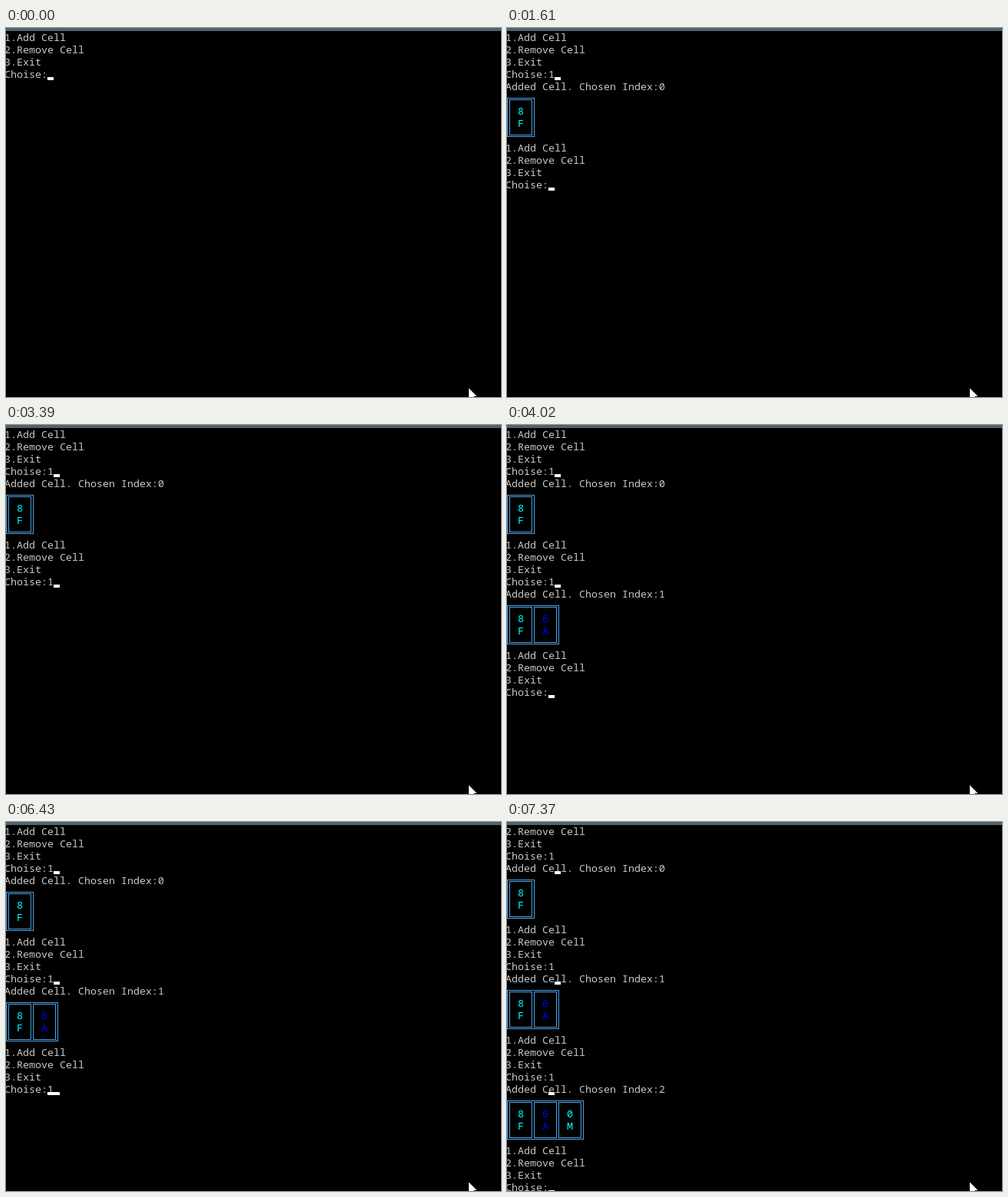
Recreate the animation shown at these times as an HTML page. Size 645x481 px, loop 8 s.

```html
<!DOCTYPE html>
<html lang="en">
<head>
<meta charset="utf-8">
<title>Console menu</title>
<style>
  html, body { margin: 0; width: 100%; height: 100%; overflow: hidden; background: #000; }
  svg { display: block; width: 645px; height: 481px; }
  text {
    font: 13.3333px "Noto Sans Mono", "DejaVu Sans Mono", monospace;
    fill: #c8c8c8;
    white-space: pre;
  }
  .frame { fill: none; stroke: #4ba3e8; shape-rendering: crispEdges; }
  .caret { fill: #fff; shape-rendering: crispEdges; }
  #log { animation: scroll 8s step-end infinite; }
  @keyframes scroll {
    0% { transform: translateY(0); }
    92.125%, 100% { transform: translateY(-16px); }
  }
</style>
</head>
<body>
<svg viewBox="0 0 645 481">
  <g id="log"></g>
  <g id="carets"></g>
  <rect width="645" height="4" fill="#4f626e"/>
  <path d="M603 469.5L613.5 480H609.5L610 481H603Z" fill="#fff"/>
</svg>
<script>
  const LOOP = 8000, COL = 8, ROW = 16, LEFT = -2, TOP = 4;
  const log = document.getElementById('log');
  const carets = document.getElementById('carets');
  const menu = ['1.Add Cell', '2.Remove Cell', '3.Exit', 'Choise:'];
  const cells = [['8', 'F', '#0ff'], ['6', 'A', '#00f'], ['0', 'M', '#0ff']];
  const menuTimes = [0, 1610, 4020, 7370];
  const typeTimes = [830, 3390, 6430];

  function add(parent, tag, attrs, content = '') {
    const el = document.createElementNS('http://www.w3.org/2000/svg', tag);
    for (const key in attrs) el.setAttribute(key, attrs[key]);
    el.textContent = content;
    return parent.appendChild(el);
  }

  // Visible only between two times of every loop.
  function show(el, from, to = LOOP) {
    const key = (time, opacity) => ({ offset: time / LOOP, opacity, easing: 'step-end' });
    const keys = [key(from, 1), key(to, to < LOOP ? 0 : 1)];
    if (from > 0) keys.unshift(key(0, 0));
    if (to < LOOP) keys.push(key(LOOP, 0));
    el.animate(keys, { duration: LOOP, iterations: Infinity });
  }

  function print(parent, col, row, string, color) {
    const el = add(parent, 'text', { x: LEFT + COL * col, y: TOP + ROW * row + 13 }, string);
    if (color) el.style.fill = color;
    return el;
  }

  function box(parent, x, y, width, height) {
    add(parent, 'rect', { class: 'frame', x, y, width, height });
  }

  function drawCells(parent, row, count) {
    const y = TOP + ROW * row + 7.5;
    box(parent, 0.5, y, 32 * count + 3, 50);
    cells.slice(0, count).forEach(([number, letter, color], i) => {
      box(parent, 3.5 + 32 * i, y + 2, 29, 46);
      print(parent, 2 + 4 * i, row + 1, number, color);
      print(parent, 2 + 4 * i, row + 2, letter, color);
    });
  }

  function caret(col, row, from, to) {
    const x = LEFT + COL * col, y = TOP + ROW * row + 12;
    show(add(carets, 'rect', { class: 'caret', x, y, width: 8, height: 4 }), from, to);
  }

  menuTimes.forEach((time, i) => {
    const row = 9 * i;
    const block = add(log, 'g', {});
    menu.forEach((line, n) => print(block, 0, row + n, line));
    if (i > 0) {
      print(block, 0, row - 5, `Added Cell. Chosen Index:${i - 1}`);
      drawCells(block, row - 4, i);
    }
    show(block, time);
  });

  typeTimes.forEach((time, i) => show(print(log, 7, 9 * i + 3, '1'), time));

  // Old carets stay on screen and do not scroll with the text.
  caret(7, 3, 0, 830);
  caret(8, 3, 830);
  caret(7, 12, 1610, 3390);
  caret(8, 12, 3390);
  caret(7, 21, 4020);
  caret(8, 21, 6430, 7370);
  caret(7, 29, 7370);
</script>
</body>
</html>
```
